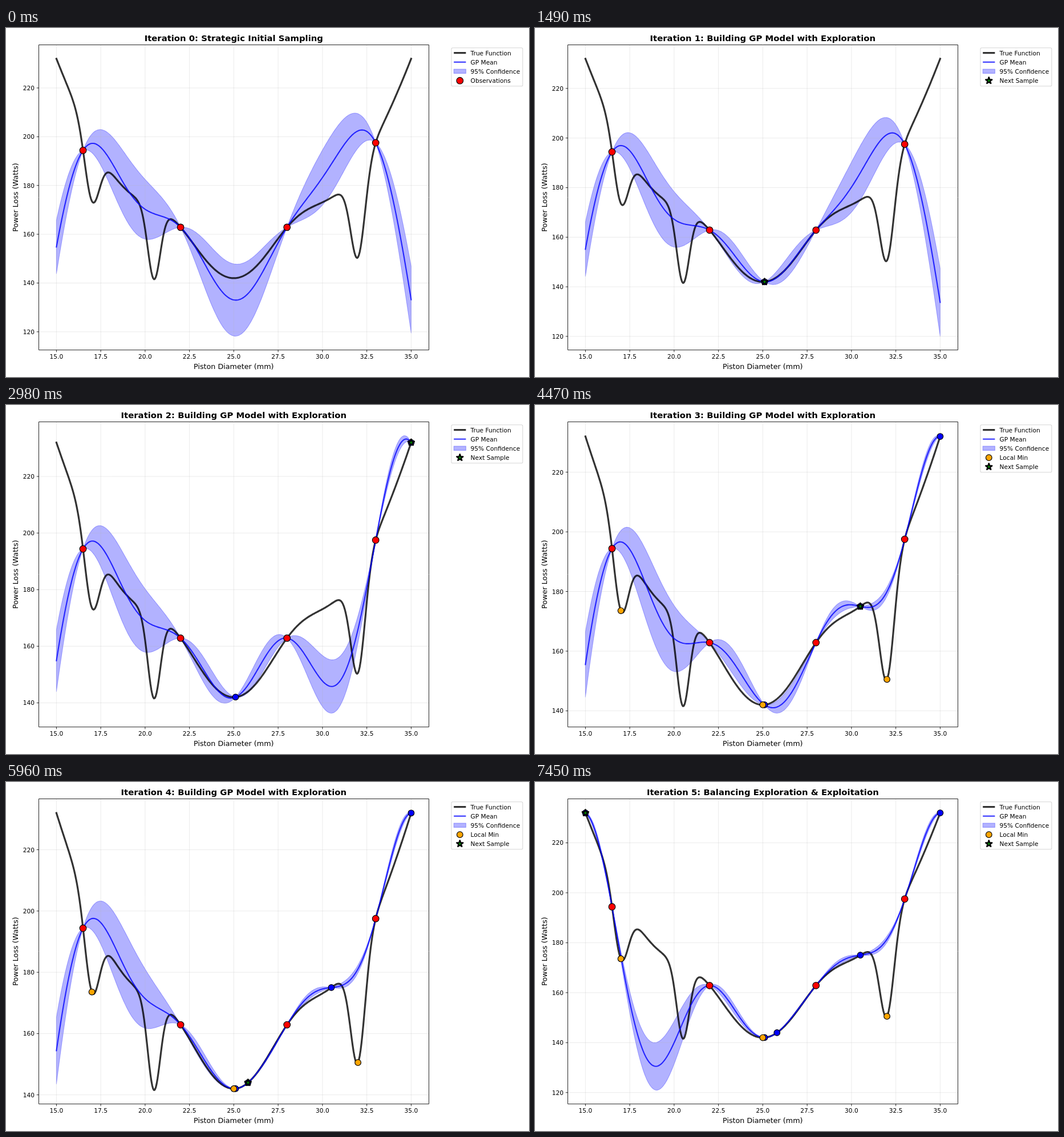
An HTML page with a canvas that plays this animation: 917 px wide and 611 px high, repeating every 8000 ms.

```html
<!DOCTYPE html>
<html lang="en">
<head>
<meta charset="utf-8">
<title>Bayesian optimisation</title>
<style>
  html, body { margin: 0; width: 100%; height: 100%; overflow: hidden; background: #fff; }
  canvas { display: block; }
</style>
</head>
<body>
<canvas id="plot" width="917" height="611"></canvas>
<script>
const ctx = document.getElementById("plot").getContext("2d");
const PT = 1.0613; // one typographic point in pixels
const LOOP = 8000, STEP = 1490;
const box = { left: 57.5, right: 741.5, top: 29.5, bottom: 563.7 };
const BAND = "rgba(0,0,255,0.3)", MEAN = "rgba(0,0,255,0.8)", TRUTH = "rgba(0,0,0,0.8)";

// A valley around 25 with shoulders, cut by three narrow dips.
const dip = (x, center, depth, width) => depth * Math.exp(-(((x - center) / width) ** 2));
function truth(x) {
  const d = Math.abs(x - 25);
  const valley = 142 + 0.802 * d ** 2.05 + 2.33 * d * d * Math.exp(-((d / 4) ** 2.7));
  return valley - dip(x, 17, 25.6, 0.58) - dip(x, 20.5, 29.9, 0.5) - dip(x, 32, 36, 0.57);
}

// Zero-mean Gaussian process with a squared exponential kernel.
const LENGTH = 2.5, SIGMA = 10;
const kernel = (a, b) => Math.exp(-((a - b) ** 2) / (2 * LENGTH ** 2));

function solve(matrix, values) {
  const rows = matrix.map((row, i) => [...row, values[i]]), n = rows.length;
  for (let i = 0; i < n; i++)
    for (let j = i + 1; j < n; j++) {
      const factor = rows[j][i] / rows[i][i];
      for (let k = i; k <= n; k++) rows[j][k] -= factor * rows[i][k];
    }
  const result = [];
  for (let i = n - 1; i >= 0; i--) {
    let sum = rows[i][n];
    for (let k = i + 1; k < n; k++) sum -= rows[i][k] * result[k];
    result[i] = sum / rows[i][i];
  }
  return result;
}

const dot = (a, b) => a.reduce((sum, v, i) => sum + v * b[i], 0);

function fit(sites) {
  const matrix = sites.map((a, i) => sites.map((b, j) => kernel(a, b) + (i === j ? 1e-8 : 0)));
  const weights = solve(matrix, sites.map(truth));
  return x => {
    const near = sites.map(s => kernel(x, s));
    const variance = Math.max(0, 1 - dot(near, solve(matrix, near)));
    return { mean: dot(near, weights), spread: 2 * SIGMA * Math.sqrt(variance) };
  };
}

const initial = [16.5, 22, 28, 33];
const localMinima = [17, 25, 32];
const picks = [25.1, 35, 30.5, 25.8, 15];
const xs = Array.from({ length: 401 }, (_, i) => 15 + i / 20);
const truthLine = xs.map(truth);

const steps = Array.from({ length: 6 }, (_, index) => {
  const phase = index === 0 ? "Strategic Initial Sampling"
    : index < 5 ? "Building GP Model with Exploration" : "Balancing Exploration & Exploitation";
  const sampled = picks.slice(0, index);
  const model = xs.map(fit([...initial, ...sampled]));
  const upper = model.map(m => m.mean + m.spread), lower = model.map(m => m.mean - m.spread);
  return {
    title: `Iteration ${index}: ${phase}`, sampled, upper, lower,
    next: picks[index - 1],
    mean: model.map(m => m.mean),
    low: Math.min(...lower, ...truthLine), high: Math.max(...upper, ...truthLine),
    minima: index > 2 ? localMinima : [],
  };
});

const toX = x => 88.4 + (x - 15) * 31.1;

function text(label, x, y, points, align = "left", weight = "normal") {
  ctx.font = `${weight} ${points * PT}px "DejaVu Sans", sans-serif`;
  ctx.textAlign = align;
  ctx.fillStyle = "#000";
  ctx.fillText(label, x, y);
}

function stroke(points, color, width, fill) {
  ctx.beginPath();
  points.forEach(([x, y]) => ctx.lineTo(x, y));
  if (fill) {
    ctx.closePath();
    ctx.fillStyle = fill;
    ctx.fill();
  }
  ctx.strokeStyle = color;
  ctx.lineWidth = width * PT;
  ctx.stroke();
}

function disc(x, y, color, area) {
  ctx.beginPath();
  ctx.arc(x, y, Math.sqrt(area) / 2 * PT, 0, 2 * Math.PI);
  ctx.fillStyle = color;
  ctx.fill();
  ctx.strokeStyle = "#000";
  ctx.lineWidth = 1.1 * PT;
  ctx.stroke();
}

function star(x, y) {
  const points = Array.from({ length: 10 }, (_, i) => {
    const r = i % 2 ? 2.48 : 6.5, angle = i * Math.PI / 5;
    return [x + r * Math.sin(angle), y - r * Math.cos(angle)];
  });
  ctx.lineJoin = "bevel";
  stroke(points, "#000", 2, "green");
  ctx.lineJoin = "round";
}

const redDisc = (x, y) => disc(x, y, "red", 120);
const blueDisc = (x, y) => disc(x, y, "blue", 100);
const orangeDisc = (x, y) => disc(x, y, "orange", 100);

function drawLegend(step) {
  const markers = [];
  if (!step.next) markers.push(["Observations", redDisc]);
  if (step.minima.length) markers.push(["Local Min", orangeDisc]);
  if (step.next) markers.push(["Next Sample", star]);

  ctx.beginPath();
  ctx.roundRect(781, 34.8, 124.9, 51 + 16 * markers.length, 2.1);
  ctx.strokeStyle = "#d6d6d6";
  ctx.lineWidth = PT;
  ctx.stroke();
  const left = 785.2, right = 806.4;
  stroke([[left, 43.6], [right, 43.6]], TRUTH, 3);
  stroke([[left, 59.7], [right, 59.7]], MEAN, 2);
  stroke([[left, 72], [right, 72], [right, 79.4], [left, 79.4], [left, 72]], BAND, 1, BAND);
  markers.forEach(([, draw], i) => draw(795.8, 92.2 + 16 * i));
  ["True Function", "GP Mean", "95% Confidence", ...markers.map(m => m[0])]
    .forEach((label, i) => text(label, 814.6, 47.6 + 16.05 * i, 10));
}

function draw(step) {
  const margin = (box.bottom - box.top) / 22;
  const scale = 20 * margin / (step.high - step.low);
  const toY = v => box.top + margin + (step.high - v) * scale;
  const trace = values => values.map((v, i) => [toX(xs[i]), toY(v)]);
  const mark = (x, shape) => shape(toX(x), toY(truth(x)));

  ctx.fillStyle = "#fff";
  ctx.fillRect(0, 0, 917, 611);
  ctx.lineJoin = "round";
  ctx.lineCap = "butt";

  const upper = trace(step.upper), lower = trace(step.lower);
  stroke([...upper, ...lower.reverse(), upper[0]], BAND, 1, BAND);

  const grid = "rgba(176,176,176,0.3)";
  for (let x = 15; x <= 35; x += 2.5) {
    stroke([[toX(x), box.top], [toX(x), box.bottom]], grid, 0.8);
    stroke([[toX(x), box.bottom], [toX(x), box.bottom + 3.7]], "#000", 0.8);
    text(x.toFixed(1), toX(x), 578.9, 10, "center");
  }
  for (let v = 120; v <= 220; v += 20) {
    const y = toY(v);
    if (y > box.bottom) continue;
    stroke([[box.left, y], [box.right, y]], grid, 0.8);
    stroke([[box.left - 3.7, y], [box.left, y]], "#000", 0.8);
    text(v, 50, y + 4, 10, "right");
  }

  ctx.lineCap = "square";
  stroke(trace(truthLine), TRUTH, 3);
  stroke(trace(step.mean), MEAN, 2);
  ctx.lineCap = "butt";
  ctx.strokeStyle = "#000";
  ctx.lineWidth = 0.8 * PT;
  ctx.strokeRect(box.left, box.top, box.right - box.left, box.bottom - box.top);

  initial.forEach(x => mark(x, redDisc));
  step.sampled.forEach(x => mark(x, blueDisc));
  step.minima.forEach(x => mark(x, orangeDisc));
  if (step.next) mark(step.next, star);

  text(step.title, 399.3, 23, 14, "center", "bold");
  text("Piston Diameter (mm)", 399.3, 596.6, 12, "center");
  ctx.save();
  ctx.translate(21, 296.5);
  ctx.rotate(-Math.PI / 2);
  text("Power Loss (Watts)", 0, 0, 12, "center");
  ctx.restore();
  drawLegend(step);
}

const start = performance.now();
let shown = -1;
function tick() {
  const index = Math.floor((performance.now() - start) % LOOP / STEP);
  if (index !== shown) draw(steps[shown = index]);
  requestAnimationFrame(tick);
}
tick();
</script>
</body>
</html>
```
